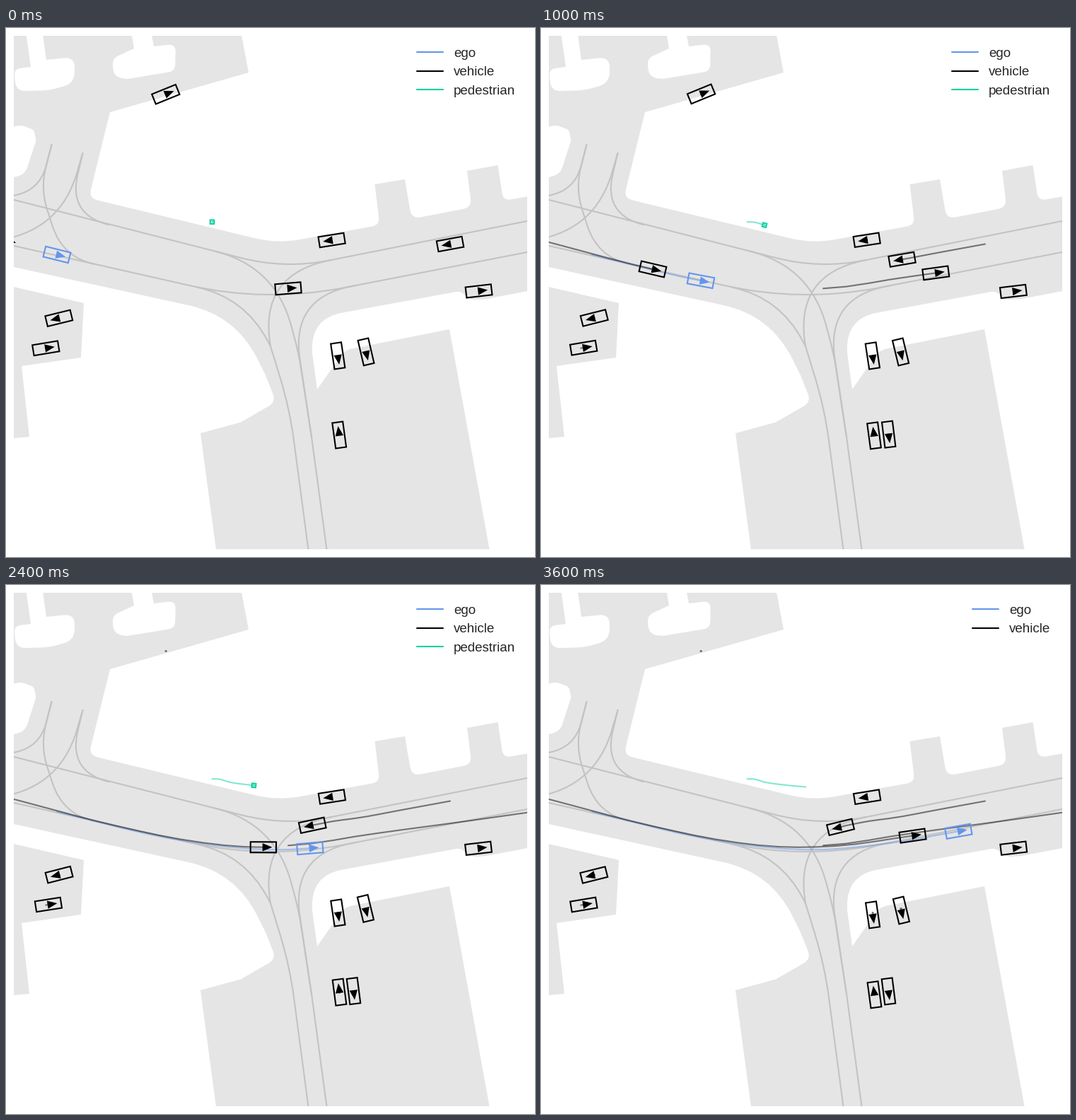
These frames come from a looping animation (748x748 px, 3800 ms). A matplotlib script:

```python
import numpy as np
import matplotlib.pyplot as plt
from matplotlib.animation import FuncAnimation
from matplotlib.lines import Line2D
from matplotlib.patches import PathPatch, Polygon
from matplotlib.path import Path

SIZE, DPI = 748, 100
FRAMES, STEP = 19, 200
LO, HI = 10.8, 737.2
LW = 1.5
GROUND, LANE = "#e5e5e5", "#c3c3c3"
BLUE, BLACK, GREEN = "#6495ed", "#000000", "#06d1a0"

plt.rcParams["font.family"] = "Liberation Sans"
rng = np.random.default_rng(4)
fig = plt.figure(figsize=(SIZE / DPI, SIZE / DPI), dpi=DPI, facecolor="white")
# Data units are stage pixels with y pointing down.
ax = fig.add_axes([LO / SIZE, 1 - HI / SIZE, (HI - LO) / SIZE, (HI - LO) / SIZE])
ax.set_xlim(LO, HI)
ax.set_ylim(HI, LO)
ax.axis("off")


# ---- map ----
def rounded(points):
    """Path through (x, y[, cut]) corners, rounded off `cut` pixels from each."""
    xy = np.array([p[:2] for p in points], float)
    verts, codes = [xy[0]], [Path.MOVETO]
    for i in range(1, len(xy)):
        cut = points[i][2] if len(points[i]) > 2 else 0
        if not cut:
            verts.append(xy[i])
            codes.append(Path.LINETO)
            continue
        into, out = xy[i - 1] - xy[i], xy[i + 1] - xy[i]
        verts += [xy[i] + cut * into / np.hypot(*into), xy[i],
                  xy[i] + cut * out / np.hypot(*out)]
        codes += [Path.LINETO, Path.CURVE3, Path.CURVE3]
    return Path(verts, codes)


def area(points, color=GROUND, z=0):
    ax.add_patch(PathPatch(rounded(points), fc=color, ec="none", zorder=z))


def lane(*points):
    ax.add_patch(PathPatch(rounded(points), fc="none", ec=LANE, lw=LW,
                           capstyle="round", zorder=2))


north = [(5, 5), (332, 5), (343, 63), (147, 119), (117, 240.6, 13),
         (383.8, 304.9, 32), (528.5, 278.6, 11), (521.5, 221), (564, 214),
         (573.5, 270, 13), (658.5, 253.6, 12), (652, 202), (695.5, 194),
         (703, 244.3, 11), (745, 237)]
south = [(745, 370.5), (672, 384.5, 12), (655, 383.5, 7), (643, 371.8, 7),
         (432, 410.5, 44), (433, 460), (440, 511), (479, 455.5, 10), (627, 426),
         (685, 745), (298, 745), (275, 573), (332, 557.5), (382, 528.7, 12),
         (367, 491), (324.8, 406.6, 68), (5, 336.7)]
area(north + south)
area([(5, 364.7), (110, 389), (106, 466), (22, 478), (33, 578), (5, 580.5)])

# white islands between the parking aisles
area([(5, 140.5), (22, 137.5, 4), (39.5, 144, 4), (42.5, 159, 2), (27, 207, 11),
      (5, 212.5)], "white", 1)
area([(28, 5), (35, 55), (11.5, 58, 9), (14, 89.5, 14), (62, 88, 10),
      (97, 78, 16), (97, 41, 15), (57, 45), (51.5, 5)], "white", 1)
area([(177, 5), (181, 29), (150.5, 43, 9), (152, 70, 14), (172, 72, 3),
      (239, 61, 9), (240, 22.5, 11), (209, 26), (205, 5)], "white", 1)

# through lanes, then the turns at the right and left junctions
lane((5, 241.4), (394.7, 341, 64), (745, 271.4))
lane((5, 306.6), (368, 388.6, 112), (745, 315.4))
lane((295, 315.5), (381, 337.5, 87), (414, 461, 20), (432, 578), (454.5, 745))
lane((495, 364), (402.5, 381.5, 88), (432, 578))
lane((270, 366.5), (338, 381.5, 69), (374, 450), (401, 538, 45), (428.5, 745))
lane((460, 328), (356, 348.6, 104), (374, 450))
lane((64.5, 165), (47.8, 230, 37), (5, 238))
lane((64.5, 165), (48.5, 227, 32), (80, 324, 46), (125, 334))
lane((108.5, 177), (77, 283.8, 82), (-10, 300))
lane((108.5, 177), (88, 263, 58), (145, 278.3))


# ---- motion ----
def drive(*keys):
    """Smooth run through (frame, x, y) keys, always facing along the path."""
    keys = np.array(keys, float)
    t, v = keys[:, 0], keys[:, 1:]
    m = np.gradient(v, t, axis=0)
    f = np.clip(np.arange(FRAMES), t[0], t[-1])
    i = np.clip(np.searchsorted(t, f, side="right") - 1, 0, len(t) - 2)
    h = (t[i + 1] - t[i])[:, None]
    s = (f - t[i])[:, None] / h
    xy = ((1 + 2 * s) * (1 - s) ** 2 * v[i] + s * (1 - s) ** 2 * h * m[i]
          + s * s * (3 - 2 * s) * v[i + 1] + s * s * (s - 1) * h * m[i + 1])
    dx, dy = np.gradient(xy, axis=0).T
    return np.column_stack([xy, np.degrees(np.arctan2(dy, dx))])


def smooth(u):
    u = np.clip(u, 0, 1)
    return u * u * (3 - 2 * u)


def park(x, y, deg, roll=0, late=0):
    """Jittering stop: rolls in by `roll`, creeps on by `late` near the end."""
    f = np.arange(FRAMES)
    along = roll * (smooth(f / 3) - 1) + late * smooth((f - 14) / 2)
    a = np.radians(deg)
    noise = rng.normal(0, 0.25, (FRAMES, 3))
    return noise + np.column_stack([x + along * np.cos(a), y + along * np.sin(a),
                                    np.full(FRAMES, deg)])


class Agent:
    def __init__(self, track, color=BLACK, first=0, last=FRAMES - 1,
                 size=(36.3, 15), arrow=(12.6, -1.2, 5.7)):
        self.track, self.first, self.last = track, first, last
        a, b = size[0] / 2, size[1] / 2
        nose, back, half = arrow
        self.body = np.array([(-a, -b), (a, -b), (a, b), (-a, b)])
        self.arrow = np.array([(nose, 0), (back, half), (back, -half)])
        self.trail, = ax.plot([], [], color=color, lw=LW, alpha=0.5, zorder=3,
                              solid_capstyle="round")
        self.box = ax.add_patch(Polygon(self.body, fc="none", ec=color, lw=LW,
                                        joinstyle="miter", zorder=4))
        self.mark = ax.add_patch(Polygon(self.arrow, fc=color, ec="none", zorder=5))

    def show(self, frame):
        past = self.track[self.first:min(frame, self.last) + 1]
        self.trail.set_data(past[:, 0], past[:, 1])
        x, y, deg = self.track[frame]
        c, s = np.cos(np.radians(deg)), np.sin(np.radians(deg))
        turn = np.array([(c, s), (-s, c)])
        corners = self.body @ turn + (x, y)
        self.box.set_xy(corners)
        self.mark.set_xy(self.arrow @ turn + (x, y))
        # An outline is only shown when it lies wholly inside the view.
        alive = self.first <= frame <= self.last
        inside = corners.min() > LO and corners.max() < HI
        self.box.set_visible(bool(alive and inside))
        self.mark.set_visible(alive)


walker = Agent(drive((0, 291.5, 274.2), (2, 301.3, 274.5), (5, 316, 278.7),
                     (10, 340.8, 282.3), (17, 374.5, 285.6)),
               GREEN, last=17, size=(5.4, 5.4), arrow=(2, -0.5, 1.3))
agents = [
    Agent(drive((0, 72, 320.5), (5, 226, 357.3), (8, 315, 370.5),
                (10, 374.3, 374.3), (14, 483.5, 366.3), (18, 590.3, 348.3)), BLUE),
    Agent(drive((0, 2, 300.5), (5, 158, 341), (8, 246.7, 359.5),
                (10, 308.3, 368), (14, 417, 369), (18, 525.5, 354.6))),
    Agent(drive((0, 399, 368.3), (1, 431, 365.7), (3, 494, 355.6),
                (8, 656.2, 333.2), (12, 788, 314.5)), last=12),
    Agent(drive((0, 628, 305.5), (3, 554.5, 319), (5, 510.5, 327.3),
                (8, 463, 334), (10, 444.5, 337.5), (18, 423.5, 342.3))),
    Agent(park(226, 93.8, -22.5), last=11),
    Agent(park(668.2, 372, -6.7)),
    Agent(park(460.7, 299.7, 171), ),
    Agent(park(75, 410, 166)),
    Agent(park(60, 452.2, -9.5, roll=3.7)),
    Agent(park(469, 463.7, 81.5, late=2.8)),
    Agent(park(509, 457.8, 76.5, late=2.2)),
    Agent(park(471.4, 576.1, -97.5, late=-3.5)),
    Agent(park(491.5, 574.4, 83), first=1),
    walker,
]


# ---- legend ----
def make_legend(**entries):
    handles = [Line2D([], [], color=color, lw=LW, solid_capstyle="round", label=name)
               for name, color in entries.items()]
    box = ax.legend(handles=handles, loc="upper right", fontsize=13.5,
                    labelcolor="#262626", frameon=False)
    return ax.add_artist(box)


full = make_legend(ego=BLUE, vehicle=BLACK, pedestrian=GREEN)
ax.legend_ = None
short = make_legend(ego=BLUE, vehicle=BLACK)
ax.legend_ = None


def update(frame):
    for agent in agents:
        agent.show(frame)
    full.set_visible(frame <= walker.last)
    short.set_visible(frame > walker.last)
    return []


anim = FuncAnimation(fig, update, frames=FRAMES, interval=STEP,
                     init_func=lambda: update(0), repeat=True, repeat_delay=0,
                     blit=False)
plt.show()
```
